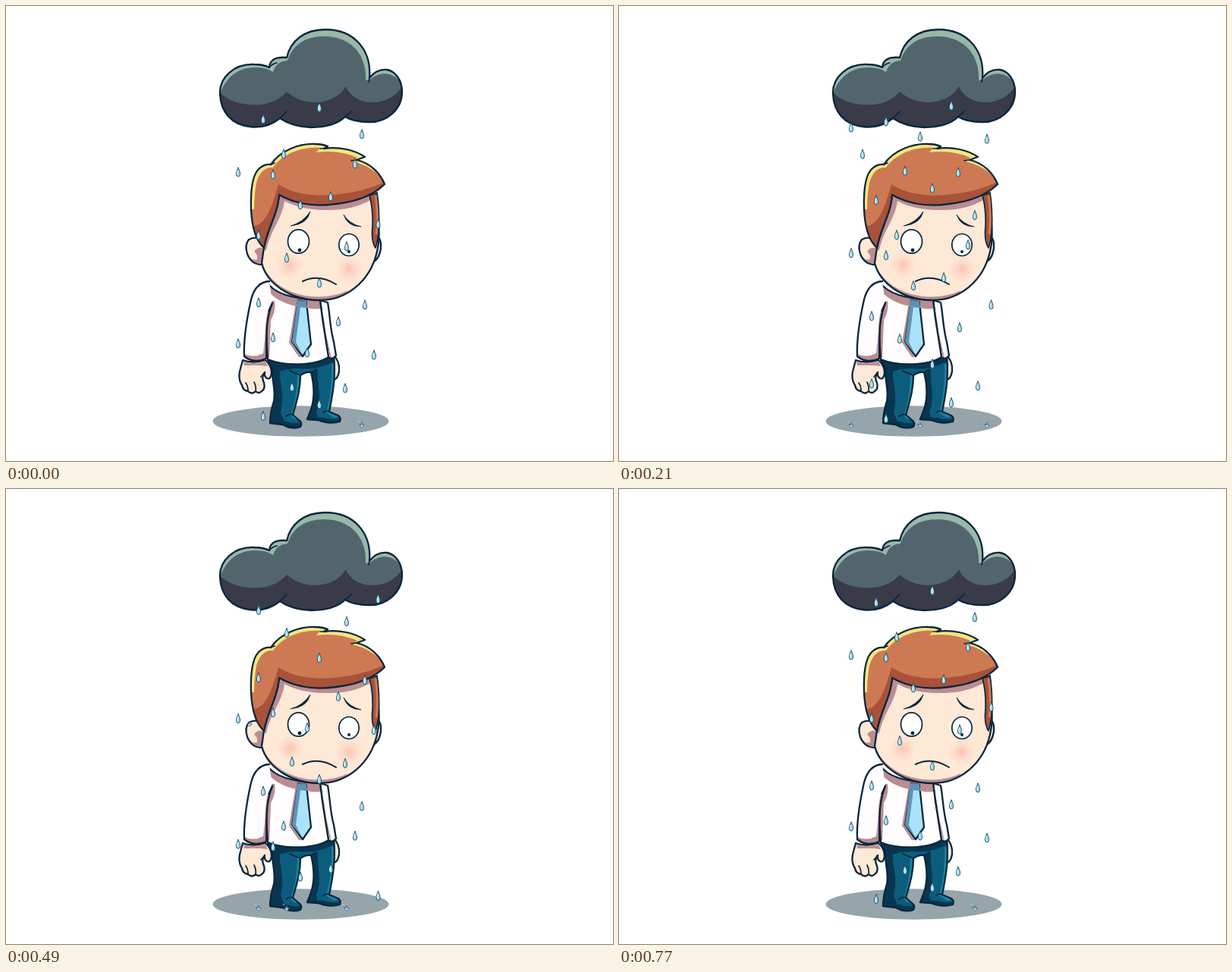
These frames come from a looping animation (800 px wide and 600 px high, 840 ms). An HTML page:

```html
<!DOCTYPE html>
<html lang="en">
<head>
<meta charset="utf-8">
<title>Rainy day</title>
<style>
html, body { margin: 0; width: 100%; height: 100%; overflow: hidden; background: #fff; }
svg { display: block; width: 100vw; height: 100vh; }
.ink { stroke: #08263c; stroke-width: 2.3; stroke-linejoin: round; stroke-linecap: round; }
.thin { stroke-width: 1.7; }
.line { fill: none; }
.skin { fill: #fee8d6; }
.mauve { fill: #b98d92; }
.shirt { fill: #fffdfe; }
.deep { fill: #083650; }
.glow { fill: #1a86a4; }
</style>
</head>
<body>
<svg viewBox="0 0 800 600" xmlns="http://www.w3.org/2000/svg">
<defs>
  <radialGradient id="blush">
    <stop offset="0" stop-color="#fbbdac" stop-opacity=".85"/>
    <stop offset="1" stop-color="#fdd0c2" stop-opacity="0"/>
  </radialGradient>
  <path id="cloud" d="M282 116C281 94 301 76 327 77Q339 77 347 81Q348 66 370 68C375 46 393 31 421 31C458 31 482 57 479 95C486 86 494 83 502 84C514 86 522 99 522 113C522 137 501 154 478 153Q458 153 447 146C437 156 421 160 402 160Q377 159 361 148C350 157 336 161 321 159C297 156 283 140 282 116Z"/>
  <path id="hair" d="M340 319C329 309 324 291 323 268C322 239 326 221 334 214Q341 208 349 209C362 190 387 181 408 182Q417 182 424 185L419 188C439 185 460 190 473 199L462 203C480 207 493 220 499 235C484 250 461 258 435 261C407 265 381 261 360 249C358 276 345 291 340 319Z"/>
  <path id="face" d="M360 248L480 248C490 268 495 300 489 324C480 363 449 388 413 388C376 388 344 367 337 339L340 318C345 292 358 275 360 248Z"/>
  <path id="pants" d="M345 467L351 478C350 493 356 506 353 521Q348 537 348 550L365 552Q376 559 388 555Q391 550 386 546L378 539C383 522 388 506 388 487Q395 482 402 483C407 503 406 520 402 532L397 545L411 546Q426 552 440 548Q442 543 438 540L426 535C430 514 435 491 432 460Z"/>
  <path id="torso" d="M344 364C351 376 370 386 414 388L417 412L425 463C407 475 367 475 345 466Q341 419 344 364Z"/>
  <path id="arm" d="M347 363Q329 364 323 387C317 414 313 441 314 462Q326 472 343 465C344 440 341 416 351 392"/>
  <clipPath id="inCloud"><use href="#cloud"/></clipPath>
  <clipPath id="inHair"><use href="#hair"/></clipPath>
  <clipPath id="inFace"><use href="#face"/></clipPath>
  <clipPath id="inPants"><use href="#pants"/></clipPath>
  <clipPath id="inTorso"><use href="#torso"/></clipPath>
  <clipPath id="inArm"><use href="#arm"/></clipPath>
  <g id="drop">
    <path d="M0-6.3C1-3 2.6-.5 2.6 2.5Q2.4 6 0 6T-2.6 2.5C-2.6-.5-1-3 0-6.3Z" fill="#9ad9eb" stroke="#1f465b" stroke-width=".9"/>
    <path d="M-.6-2Q-1.8 2-.5 4" fill="none" stroke="#e7faff" stroke-width="1.1"/>
  </g>
  <g id="splash">
    <path d="M-3-1Q-2 4 0 4T3 0L1 1L0-3L-1 1Z" fill="#b5e6f2" stroke="#315c70" stroke-width=".7"/>
    <circle cx="-4" cy="-4" r=".8" fill="#b5e6f2"/>
  </g>
</defs>

<ellipse cx="388.5" cy="547.5" rx="116" ry="20.2" fill="#96a4ac"/>

<g id="sky">
  <use href="#cloud" fill="#98b8aa"/>
  <g clip-path="url(#inCloud)">
    <path d="M280 125C285 98 303 81 328 81Q344 81 352 87Q356 73 371 72C378 51 394 40 420 40C453 40 476 63 474 98L480 97C490 88 503 87 512 93Q520 98 524 109V165H280Z" fill="#52656d"/>
    <path d="M278 109C289 126 313 132 337 130Q358 127 370 113C383 125 405 131 425 124Q440 119 448 106C453 119 468 128 486 127Q511 125 524 103V168H278Z" fill="#393b49"/>
  </g>
  <use href="#cloud" class="ink line"/>
  <path class="ink thin line" d="M347 81Q351 76 357 75M361 148Q366 143 370 139M447 146Q452 142 456 138M479 95L478 100"/>
</g>

<g id="legs">
  <path class="ink skin" d="M432 461Q440 468 439 482Q437 493 431 493L428 476Z"/>
  <use href="#pants" fill="#0c5d7d"/>
  <g clip-path="url(#inPants)">
    <path class="deep" d="M343 466Q383 481 434 461V468Q411 481 386 478Q371 478 361 482C360 497 368 512 362 536L369 553H344ZM401 483L411 479C410 502 417 518 409 535L412 549H395Z"/>
    <path class="glow" d="M384 486H389C388 508 382 525 379 537L388 546L380 545Q373 540 376 537C381 523 384 505 384 486ZM429 472H434C434 496 429 516 427 534L440 541L432 543L422 536C427 518 430 496 429 472Z"/>
    <path class="deep" d="M347 541Q357 547 371 548Q381 552 390 549V560H347ZM396 539Q406 542 420 543Q432 547 443 543V556H396Z"/>
  </g>
  <use href="#pants" class="ink line"/>
  <path class="ink thin line" d="M388 487Q380 484 374 481M402 483L409 479M369 541Q374 537 378 539M418 536Q422 533 426 535"/>
</g>

<g id="shirt">
  <path class="ink shirt" d="M414 388L424 391C427 407 427 425 432 443L435 461Q430 467 425 463L417 412Z"/>
  <path d="M418 410L421 433L428 463" fill="none" stroke="#b98d92" stroke-width="1.5"/>
  <use href="#torso" class="shirt"/>
  <path class="ink" fill="#abe2fa" d="M384 387L396 389L397 400L402 446L391 462L376 443Z"/>
  <path d="M384 388L396 389L397 398Q391 398 388 397L382 443L390 459L377 443Z" fill="#5f93b3"/>
  <g clip-path="url(#inTorso)">
    <path class="mauve" d="M340 360Q359 379 421 386V398Q408 401 397 398V389L384 387L383 396Q356 391 340 370ZM345 388L354 389Q356 402 349 414L347 463H342ZM382 391L384 387L376 443L390 463L386 463L373 444Z"/>
  </g>
  <use href="#torso" class="ink line"/>
  <use href="#arm" class="shirt"/>
  <g clip-path="url(#inArm)">
    <path class="mauve" d="M352 390C341 402 343 421 341 440L339 458Q326 465 312 458V472H346Z"/>
  </g>
  <use href="#arm" class="ink line"/>
  <path class="ink thin line" d="M351 391L346 402"/>
  <path class="ink skin" d="M312 467Q325 472 342 467Q350 474 350 484Q349 493 344 491Q340 489 341 483Q336 489 340 497Q342 505 337 508Q333 512 329 508Q324 513 319 508Q312 507 311 500Q305 491 309 478Z"/>
  <path class="mauve" d="M313 469Q327 473 342 469L345 475Q333 473 314 474Z"/>
  <path class="ink thin line" d="M329 508Q330 502 327 496M319 508Q319 501 316 497M341 483L336 489"/>
</g>

<g id="head">
  <path class="ink skin" d="M486 305Q495 303 494 319Q492 335 482 338Z"/>
  <path class="ink skin" d="M340 311Q330 302 320 308Q314 315 318 327Q324 342 340 341Z"/>
  <path class="mauve" d="M338 319Q330 318 327 324Q332 327 331 334Q326 336 321 331Q328 341 338 340Z"/>
  <use href="#face" class="skin"/>
  <g clip-path="url(#inFace)">
    <path class="mauve" d="M358 245L482 246L491 262L480 256Q457 269 427 269Q390 270 367 257C364 281 349 294 343 322L337 322ZM334 333Q348 370 385 380Q421 389 451 375L437 391Q370 399 336 352Z"/>
  </g>
  <circle cx="374" cy="342" r="18" fill="url(#blush)"/>
  <circle cx="452" cy="347" r="18" fill="url(#blush)"/>
  <use href="#face" class="ink line"/>
  <path class="ink thin" fill="#a8523a" d="M479 250L489 246Q493 273 491 301Q489 313 487 319Q481 310 483 291Q484 268 479 250Z"/>
  <path d="M487 250Q491 275 488 301" fill="none" stroke="#cd7b56" stroke-width="3"/>
  <use href="#hair" fill="#cd7a54"/>
  <g clip-path="url(#inHair)">
    <path d="M359 235C379 249 411 252 439 248Q472 245 501 231V255L440 271L361 260L340 321L324 290C341 292 351 265 359 235Z" fill="#a8523a"/>
    <path d="M322 268C319 235 327 213 349 208C364 182 396 178 427 182L420 188Q446 183 476 197L466 203Q492 210 502 235Q486 212 457 205L463 200Q438 189 409 193L414 187C387 185 363 197 352 213Q336 212 330 233Q327 250 327 268Z" fill="#f3e67e"/>
  </g>
  <use href="#hair" class="ink line"/>
  <path class="ink thin line" d="M349 209L354 207M419 188L414 188M462 203L455 204"/>
  <g class="ink thin" fill="#fff">
    <ellipse cx="385.5" cy="310.5" rx="14" ry="15.7"/>
    <ellipse cx="452" cy="315" rx="13.2" ry="14.5"/>
  </g>
  <circle cx="387" cy="322" r="2.4" fill="#08263c"/>
  <circle cx="452" cy="324" r="2" fill="#08263c"/>
  <path fill="#08263c" d="M375 290Q392 285 401 271Q397 288 375 290ZM445 275Q452 287 468 291Q450 291 445 275Z" stroke="#08263c" stroke-width=".7"/>
  <path class="ink line" d="M391 363Q412 353 435 367" style="stroke-width:2"/>
</g>
<g id="rain"></g>
</svg>
<script>
const STEP = 70, COUNT = 12, LAP = 11;
const TOP = 123, GROUND = 548, FALL = 35.6, SPAN = FALL * LAP;

// Column, height at step 0 and, if not the ground, where the drop lands
const drops = [
  [306, 219], [306, 445], [321, 480, 305], [333, 302], [333, 391], [339, 149],
  [352, 222], [352, 437], [366, 195], [370, 332], [377, 502], [388, 262],
  [397, 457], [413, 365], [413, 525], [428, 251], [438, 416], [447, 504],
  [449, 317], [460, 208], [469, 169], [473, 394], [485, 460], [490.5, 287]
];

const rain = document.getElementById("rain");
const stamp = (name, x, y) => `<use href="#${name}" x="${x}" y="${y.toFixed(1)}"/>`;
let shown = -1;

function drawDrop(x, y, floor) {
  if (y < floor) return stamp("drop", x, y);
  return y < floor + FALL ? stamp("splash", x, floor + 4) : "";
}

function draw(step) {
  rain.innerHTML = drops.map(([x, start, floor = GROUND]) => {
    const y = TOP + (start - TOP + FALL * step) % SPAN;
    return drawDrop(x, y, floor) + drawDrop(x, y + SPAN, floor);
  }).join("");
}

function tick(time) {
  const step = Math.floor(time / STEP) % COUNT;
  if (step !== shown) draw(shown = step);
  requestAnimationFrame(tick);
}

draw(0);
requestAnimationFrame(tick);
</script>
</body>
</html>
```
